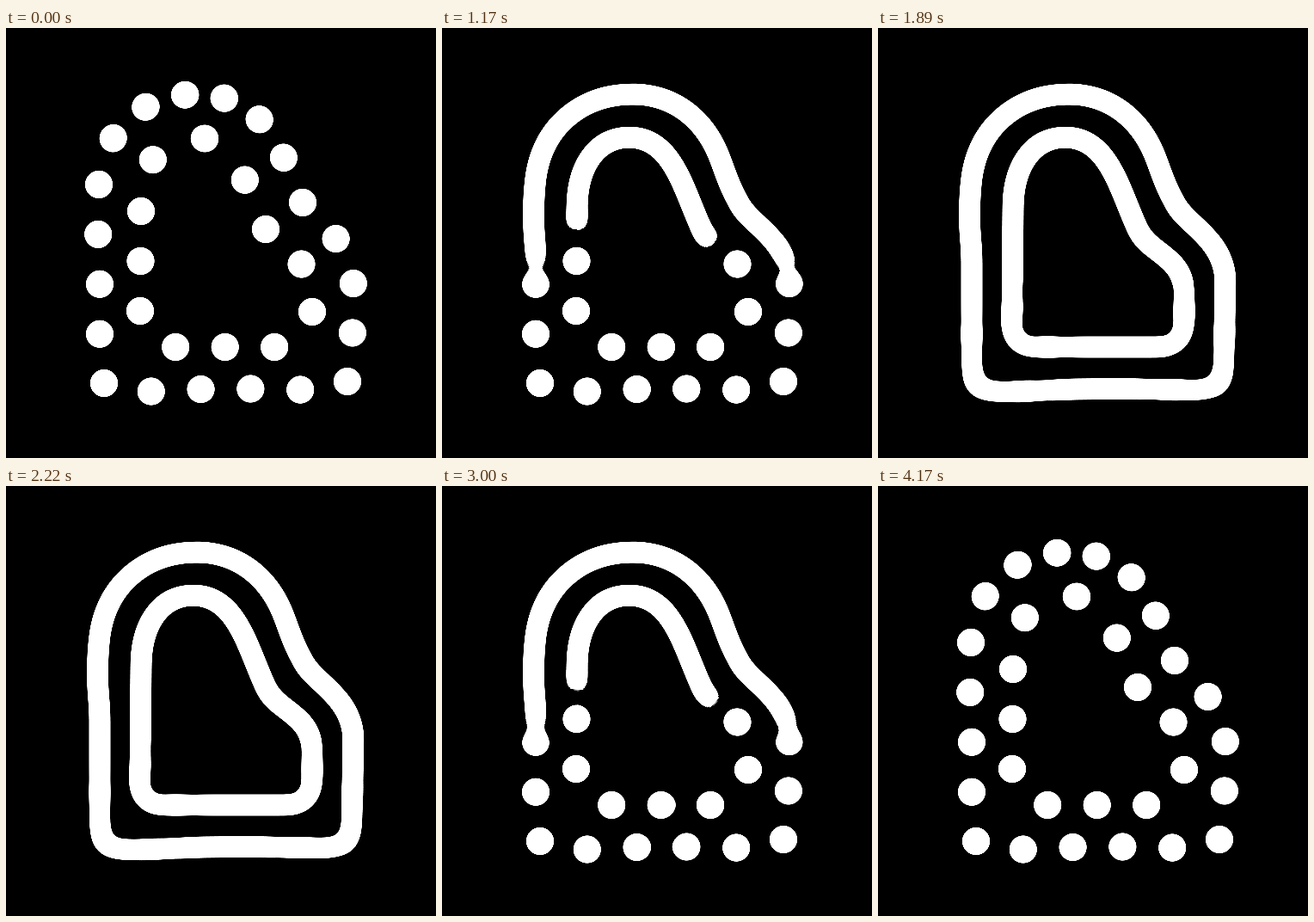
Recreate the animation shown at these times as an HTML page with a canvas. Size 500x500 px, loop 4200 ms.

```html
<!DOCTYPE html>
<html lang="en">
<head>
<meta charset="utf-8">
<title>Dots melting into lines</title>
<style>
  html, body { margin: 0; width: 100%; height: 100%; overflow: hidden; background: #000; }
  canvas { display: block; width: 500px; height: 500px; }
</style>
</head>
<body>
<canvas id="stage" width="500" height="500"></canvas>
<script>
const SIZE = 500, LOOP = 4200, STEP = 30;
const STROKE = 25, RADIUS = 16.8, BLUR = 5;
const SPEED = 220;             // px of outline joined per unit of progress
const SOFT = 0.03, EDGE = 30;  // softness of the joining front, hardness of the rim
const start = performance.now();

// Sides run clockwise: crown, right, base, left. Each carries `gaps` dot gaps;
// `swing` crowds the dots towards its middle (or its ends, if negative).
// `lead` is the length joined early at the crown, `seed` shifts the base's first joint.
const outlines = [
  { lead: 148, seed: 0, sides: [
    { gaps: 7, swing: .018, d: 'M108 182C114 112 165 77 222 77C272 77 305 108 321 146C330 168 332 181 345 203' },
    { gaps: 4, swing: 0, d: 'M345 203C354 226 402 244 404 292C403 325 403 370 402 390Q402 402 397 411' },
    { gaps: 5, swing: 0, d: 'M397 411Q392 421 366 421L282 419.5L227 420C200 421 168 423 150 423C130 423 118 421 114 413' },
    { gaps: 4, swing: 0, d: 'M114 413Q109 405 109 385V270C109 250 106 240 106.5 215Q106.5 198 108 182' }
  ] },
  { lead: 21, seed: -25, sides: [
    { gaps: 4, swing: -.014, d: 'M157 213C156 160 180 127 218 127C268 127 280 186 302 234' },
    { gaps: 2, swing: 0, d: 'M302 234C314 262 355 265 356 306V330' },
    { gaps: 4, swing: .03, d: 'M356 330V340C356 360 346 371 326 371H183C165 371 155 361 155 341L156 329' },
    { gaps: 2, swing: 0, d: 'M156 329L157 213' }
  ] }
];

const dots = [];   // dot centres
const route = [];  // points along the outlines with the progress at which they join

for (const { lead, seed, sides } of outlines) {
  let total = 0;
  for (const side of sides) {
    side.path = document.createElementNS('http://www.w3.org/2000/svg', 'path');
    side.path.setAttribute('d', side.d);
    side.length = side.path.getTotalLength();
    side.from = total;
    total += side.length;
  }
  const [crown, , base] = sides.map(side => side.from + side.length / 2);
  const away = (s, middle) => {
    const gap = Math.abs(s - middle);
    return Math.min(gap, total - gap);
  };

  for (const { path, length, from, gaps, swing } of sides) {
    for (let k = 0; k < gaps; k++) {
      const u = k / gaps;
      dots.push(path.getPointAtLength(length * (u + swing * Math.sin(2 * Math.PI * u))));
    }
    for (let s = 0; s < length; s += 2) {
      const { x, y } = path.getPointAtLength(s);
      const fromCrown = (away(from + s, crown) - lead) / SPEED;
      const fromBase = .63 + away(from + s, base + seed) / SPEED;
      route.push({ x, y, join: Math.max(.1, Math.min(.9, fromCrown, fromBase)) });
    }
  }
}

// Draws in white on black with a blur and returns the pixels.
function softField(paint) {
  const c = document.createElement('canvas');
  c.width = c.height = SIZE;
  const ctx = c.getContext('2d');
  ctx.fillRect(0, 0, SIZE, SIZE);
  ctx.filter = `blur(${BLUR}px)`;
  ctx.fillStyle = ctx.strokeStyle = '#fff';
  paint(ctx);
  return ctx.getImageData(0, 0, SIZE, SIZE).data;
}

const lineField = softField(ctx => {
  const all = new Path2D();
  for (const { sides } of outlines) {
    for (const { d } of sides) all.addPath(new Path2D(d));
  }
  ctx.lineWidth = STROKE;
  ctx.lineCap = ctx.lineJoin = 'round';
  ctx.stroke(all);
});

const dotField = softField(ctx => {
  ctx.beginPath();
  for (const { x, y } of dots) {
    ctx.moveTo(x + RADIUS, y);
    ctx.arc(x, y, RADIUS, 0, 2 * Math.PI);
  }
  ctx.fill();
});

function joinAt(x, y) {
  let best = Infinity, join = 0;
  for (const p of route) {
    const d = (p.x - x) ** 2 + (p.y - y) ** 2;
    if (d < best) {
      best = d;
      join = p.join;
    }
  }
  return join;
}

// Only pixels that can ever light up are kept.
const cells = [];
for (let i = 0; i < SIZE * SIZE; i++) {
  const line = lineField[i * 4] / 255, dot = dotField[i * 4] / 255;
  if (Math.max(line, dot) > .45) {
    cells.push({ at: i, line, dot, join: joinAt(i % SIZE, Math.floor(i / SIZE)) });
  }
}

const stage = document.getElementById('stage').getContext('2d');
const image = stage.createImageData(SIZE, SIZE);
const pixels = new Uint32Array(image.data.buffer).fill(0xff000000);
let shown = -1;

function draw(time) {
  const progress = (1 - Math.cos(2 * Math.PI * time / LOOP)) / 2;
  for (const { at, line, dot, join } of cells) {
    const mix = 1 / (1 + Math.exp((join - progress) / SOFT));
    const level = dot + (line - dot) * mix;
    const v = Math.max(0, Math.min(255, Math.round(((level - .5) * EDGE + .5) * 255)));
    pixels[at] = 0xff000000 | v * 0x010101;
  }
  stage.putImageData(image, 0, 0);
}

function tick() {
  const time = Math.floor((performance.now() - start) % LOOP / STEP) * STEP;
  if (time !== shown) draw(shown = time);
  requestAnimationFrame(tick);
}
tick();
</script>
</body>
</html>
```
